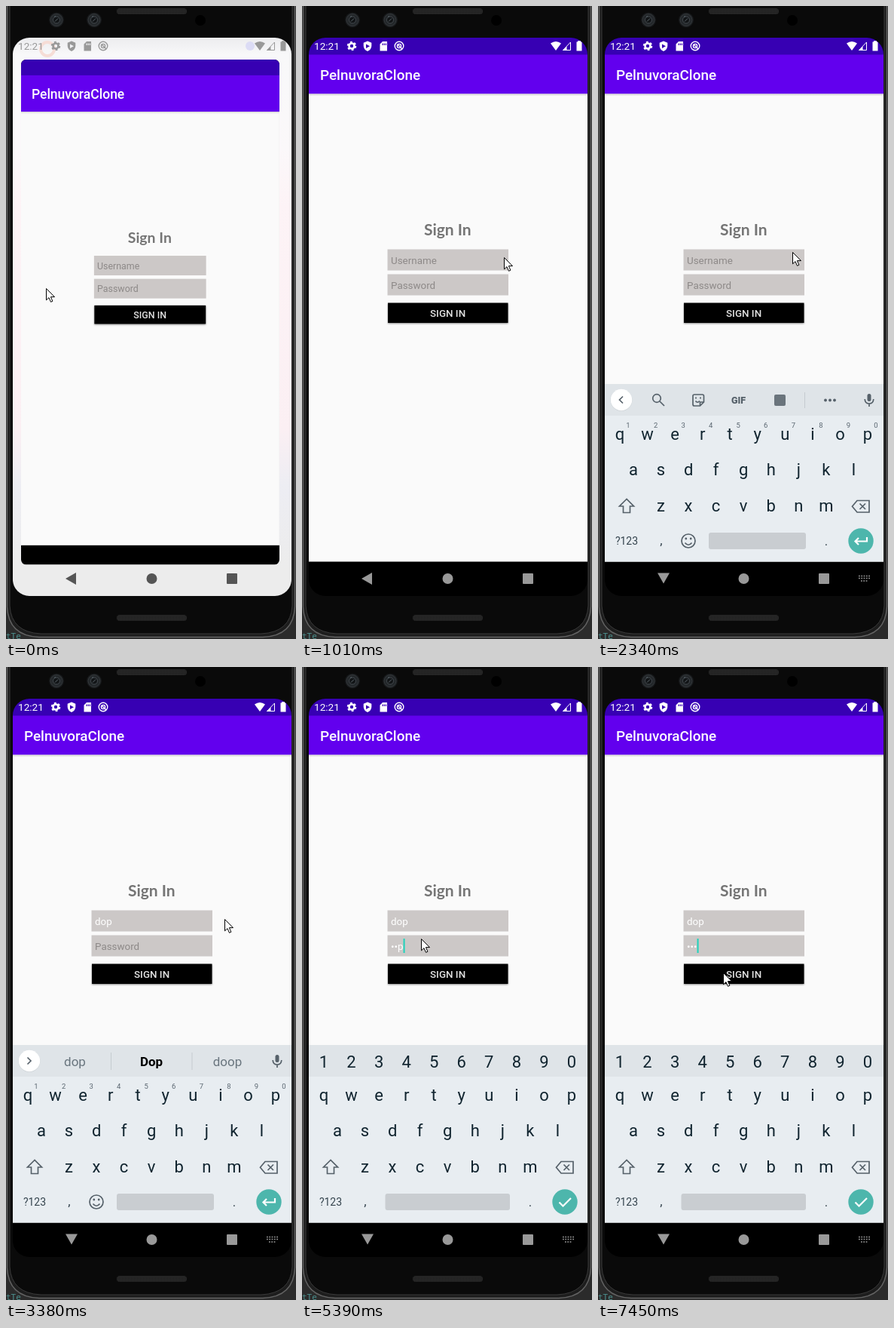
An HTML page that plays this animation: 385 by 839 pixels, repeating every 8 s.

```html
<!DOCTYPE html>
<html lang="en">
<head>
<meta charset="utf-8">
<title>Sign in</title>
<style>
  html, body { margin: 0; width: 100%; height: 100%; overflow: hidden; background: #0a0a0a; }
  svg { display: block; width: 100vw; height: 100vh; font-family: Roboto, sans-serif; }
  .mid { text-anchor: middle; }
  .key { font-size: 22px; fill: #10242f; text-anchor: middle; }
  .dot { font-size: 17px; fill: #35444e; text-anchor: middle; }
  .sup { font-size: 9.5px; fill: #5a6670; text-anchor: middle; }
  .word { font-size: 17px; fill: #69757e; text-anchor: middle; }
  .field { font-size: 13.4px; }
  .line { fill: none; stroke: #56616a; stroke-width: 1.7; }
  .raised { filter: drop-shadow(0 1px 1px rgba(0, 0, 0, .45)); }
</style>
</head>
<body>
<svg viewBox="0 0 385 839" preserveAspectRatio="none">
  <defs>
    <linearGradient id="wall" x2="0" y2="1">
      <stop offset="0" stop-color="#ececee"/>
      <stop offset=".03" stop-color="#f8f8f9"/>
      <stop offset=".2" stop-color="#fbf8fa"/>
      <stop offset=".3" stop-color="#fdf3f6"/>
      <stop offset=".7" stop-color="#fbeff3"/>
      <stop offset=".8" stop-color="#ededf3"/>
      <stop offset=".95" stop-color="#ececec"/>
    </linearGradient>
    <linearGradient id="barShadow" x2="0" y2="1">
      <stop offset="0" stop-color="#d2d2d2"/>
      <stop offset="1" stop-color="#fafafa"/>
    </linearGradient>
    <pattern id="mesh" width="2" height="2" patternUnits="userSpaceOnUse">
      <rect width="2" height="2" fill="#292929"/>
      <rect width="1" height="1" fill="#171717"/>
    </pattern>
    <clipPath id="screenClip"><rect x="9" y="42" width="370" height="740" rx="22"/></clipPath>
    <clipPath id="openClip"><rect x="9" y="42" width="370" height="722" rx="7"/></clipPath>
    <clipPath id="kbClip"><rect x="9" y="117" width="370" height="619.500"/></clipPath>
    <g id="lens">
      <circle r="10" fill="#17191b"/>
      <circle r="8" fill="#23272a" stroke="#34383b"/>
      <circle r="4.500" fill="#121517" stroke="#454b50"/>
      <path d="M-2 2L2-2M-3-4L-1-5" stroke="#5d676e"/>
    </g>
  </defs>

  <!-- phone body -->
  <rect width="385" height="839" fill="#2b2b2b"/>
  <text x="0" y="839" font-size="11" fill="#4c8f8d" style="font-family:'DejaVu Sans Mono',monospace">tTe</text>
  <path d="M1.500-5V796Q3 835 44 836.500H341Q382 835 383.500 796V-5Z" fill="#1d1d1d" stroke="#636363" stroke-width="1.500"/>
  <path d="M5-5V795Q7 830 46 832H339Q378 830 380 795V-5Z" fill="#0a0a0a" stroke="#3a3a3a"/>
  <rect x="147" y="3" width="93" height="8" rx="4" fill="url(#mesh)"/>
  <rect x="147" y="807" width="93" height="8" rx="4" fill="url(#mesh)"/>
  <use href="#lens" x="67" y="18.500"/>
  <use href="#lens" x="117" y="18.500"/>
  <circle cx="258" cy="19" r="7" fill="#000"/>

  <g clip-path="url(#screenClip)">
    <g id="home">
      <rect x="9" y="42" width="370" height="740" fill="url(#wall)"/>
      <circle cx="55" cy="57" r="9" fill="none" stroke="#f6ddd6" stroke-width="4"/>
      <circle cx="324" cy="53" r="6" fill="#dcdcf5"/>
    </g>
    <g id="appClip">
      <g id="app">
        <rect x="9" y="42" width="370" height="740"/>
        <rect x="9" y="42" width="370" height="23" fill="#3700b3"/>
        <rect x="9" y="116" width="370" height="620.500" fill="#fafafa"/>
        <rect x="9" y="64.500" width="370" height="52" fill="#6200ee"/>
        <rect x="9" y="116.500" width="370" height="3" fill="url(#barShadow)"/>
        <text x="24" y="98" font-size="18.9" font-weight="500" fill="#fff">PelnuvoraClone</text>
        <text class="mid" x="193.300" y="304" font-size="21" font-weight="700" fill="#757575" style="font-family:Lato,sans-serif">Sign In</text>
        <rect x="113.500" y="322.500" width="160.500" height="28" fill="#ccc8c7"/>
        <rect x="113.500" y="355.500" width="160.500" height="28" fill="#ccc8c7"/>
        <text class="field" id="user" x="118" y="342"></text>
        <text class="field" id="pass" x="118" y="374.700"></text>
        <rect id="caret" width="2" height="19" fill="#1fd3bc"/>
        <rect class="raised" x="114" y="393.500" width="159.500" height="26.500"/>
        <text class="mid" x="193.600" y="412.300" font-size="13.4" font-weight="500" fill="#e2e2e2">SIGN IN</text>
      </g>
    </g>

    <g clip-path="url(#kbClip)">
      <g id="kb">
        <rect x="9" y="501" width="370" height="236" fill="#e8edf1"/>
        <rect x="9" y="501" width="370" height="42" fill="#dfe4e8"/>
        <g id="keys"></g>
        <path class="line" d="M38 653.500L28.500 663H33.500V671.500H42.500V663H47.500Z"/>
        <path class="line" d="M344 655.500H360V671H344L337.500 663.300ZM347.500 659.500L355 667M355 659.500L347.500 667"/>
        <text class="mid" x="38" y="714" font-size="14" fill="#35444e">?123</text>
        <rect id="space" y="698" height="22" rx="3" fill="#c9cdd1"/>
        <circle cx="349" cy="709" r="16.700" fill="#4db6ac"/>
        <path id="action" fill="none" stroke="#fff" stroke-width="2.200"/>

        <g id="letterExtras">
          <g id="sups"></g>
          <g class="line">
            <circle cx="120" cy="709" r="9"/>
            <path d="M115.500 711.500Q120 717 124.500 711.500"/>
          </g>
          <g fill="#56616a"><circle cx="116.800" cy="706" r="1.400"/><circle cx="123.200" cy="706" r="1.400"/></g>
          <circle cx="31" cy="522.500" r="14.500" fill="#cfd5d9"/>
          <circle cx="31" cy="522" r="14.200" fill="#fff"/>
          <path id="chevron" class="line"/>
          <rect x="357.500" y="514" width="5" height="10" rx="2.500" fill="#56616a"/>
          <path class="line" d="M354.200 521Q354.500 527 360 527T365.800 521M360 527V531" stroke-width="1.500"/>
        </g>
        <g id="tools">
          <circle class="line" cx="78" cy="520" r="5.300" stroke-width="2"/>
          <path class="line" d="M82 524L88 530" stroke-width="2.200"/>
          <path class="line" d="M140.500 525V517Q140.500 515 138.500 515H128Q126 515 126 517V528Q126 530 128 530H135.500ZV525H135.500V530"/>
          <path class="line" d="M129.500 523.500Q132 527 135 523.500M130 518.500v2M136 518.500v2" stroke-width="1.500"/>
          <text class="mid" x="186.500" y="526.500" font-size="12.500" font-weight="900" fill="#56616a">GIF</text>
          <rect x="234" y="515" width="15" height="15" rx="2" fill="#6a747c"/>
          <path d="M274.500 512V533" stroke="#c5cbd0"/>
          <g fill="#56616a"><circle cx="302" cy="522.500" r="1.900"/><circle cx="308" cy="522.500" r="1.900"/><circle cx="314" cy="522.500" r="1.900"/></g>
        </g>
        <g id="words">
          <path d="M139.500 511V534M247 511V534" stroke="#c5cbd0"/>
          <text class="word" x="91.500" y="529">dop</text>
          <text class="word" x="193" y="529" style="fill:#000;font-weight:700">Dop</text>
          <text class="word" x="294" y="529">doop</text>
        </g>
      </g>
    </g>

    <!-- status bar -->
    <g id="status">
      <text x="16" y="58.300" font-size="13.6">12:21</text>
      <circle cx="66" cy="53" r="3.500" fill="none" stroke="currentColor" stroke-width="2.600"/>
      <circle cx="66" cy="53" r="5.300" fill="none" stroke="currentColor" stroke-width="1.900" stroke-dasharray="2.8 2.75"/>
      <path fill-rule="evenodd" d="M87 46.500L92.300 48.800V53Q92 58 87 60Q82 58 81.700 53V48.800ZM85 50.500V56L90 53.200Z"/>
      <path fill-rule="evenodd" d="M107 47H113V59.500H103.500V50.500ZM106.500 49.500V52H107.700V49.500ZM108.700 49.500V52H109.900V49.500ZM110.900 49.500V52H112V49.500Z"/>
      <g fill="none" stroke="currentColor" stroke-width="1.400">
        <circle cx="129" cy="53" r="5.800"/>
        <circle cx="129" cy="53" r="2.600"/>
        <path d="M127 51L133 57"/>
        <path d="M346.500 58.500H356.500V48Z" stroke-width="1"/>
      </g>
      <path d="M330 49.500Q337 44.500 344 49.500L337 59Z"/>
      <path d="M346 59L351.500 53.500V59Z"/>
      <path d="M366 47.500V46.300H370V47.500H371.500V59.500H364.500V47.500Z"/>
    </g>

    <!-- navigation bar -->
    <g id="nav">
      <path id="back"/>
      <circle cx="193.500" cy="759" r="7"/>
      <rect x="293" y="752" width="14" height="14" rx="1"/>
      <path id="kbIcon" d="M346 755.500H361M346 758.500H361M349 762H358" stroke="currentColor" stroke-width="1.700" stroke-dasharray="1.8 1.5"/>
    </g>
  </g>

  <path id="mouse" d="M.5.5V15.800L4 12.600L6.500 18.300L8.900 17.200L6.400 11.600H11.500Z" fill="#fff" stroke="#000"/>
</svg>

<script>
const LOOP = 8000;
const $ = id => document.getElementById(id);
const set = (id, attrs) => {
  for (const name in attrs) $(id).setAttribute(name, attrs[name]);
};
const show = (id, on) => $(id).style.display = on ? "" : "none";
const text = (cls, x, y, s) => `<text class="${cls}" x="${x}" y="${y}">${s}</text>`;
const row = (cls, chars, x, y) =>
  [...chars].map((c, i) => text(cls, x + i * 36.55, y, c)).join("");

$("keys").innerHTML =
  `<g id="digits">${row("key", "1234567890", 29, 531)}</g>` +
  row("key", "qwertyuiop", 29, 574.5) +
  row("key", "asdfghjkl", 47, 621.5) +
  row("key", "zxcvbnm", 83.5, 669.5) +
  text("dot", 84, 714, ",") + text("dot", 303, 715, ".");
$("sups").innerHTML = row("sup", "1234567890", 40, 559);

// Each entry holds from its time until the next one.
const at = (track, t) => track.reduce((found, step) => t >= step[0] ? step : found);

const mouse = [
  [0, 53, 374], [480, 54, 375],
  [620, 96, 366], [740, 168, 349], [860, 221, 339],
  [1010, 268, 333], [1130, 282, 329], [1250, 276, 327], [1370, 265, 327], [1490, 259, 327],
  [1860, 258, 326],
  [3380, 290, 334], [3500, 337, 345], [3620, 265, 352], [3740, 190, 358], [3860, 158, 359],
  [4010, 158, 360],
  [5930, 157, 361], [6050, 155, 361], [6190, 154, 376], [6310, 154, 394], [6440, 155, 404],
  [7210, 160, 405], [7330, 164, 405], [7450, 166, 405]
];
const userTyped = [[0, ""], [2730, "do"], [2850, "dop"]];
const passTyped = [[0, ""], [5150, "d"], [5270, "•o"], [5390, "••p"], [6930, "•••"]];
const caretOn = [
  [0, 0], [2460, 1], [3380, 0], [3860, 1], [4620, 0],
  [5150, 1], [5930, 0], [6440, 1], [6930, 0], [7450, 1]
];
const kbDrop = [[0, 240], [2220, 95], [2340, 0]];

function fill(id, typed, hint) {
  const el = $(id), value = typed || hint;
  if (el.textContent !== value) el.textContent = value;
  el.setAttribute("fill", typed ? "#fff" : "#8d8988");
  return typed ? el.getComputedTextLength() : 0;
}

function tint(id, color) {
  set(id, { fill: color, color });
}

function draw(t) {
  const opening = t < 120, keyboard = t >= 1980, numeric = t >= 4620;
  const suggest = t >= 3100 && t < 4370;

  show("home", opening);
  set("app", {
    "clip-path": opening ? "url(#openClip)" : "none",
    transform: opening ? "translate(20 71) scale(.927) translate(-9 -42)" : ""
  });
  tint("status", opening ? "#999999" : t < 240 ? "#8f78ce" : "#ffffff");
  tint("nav", opening ? "#555555" : t < 240 ? "#bdbdbd" : "#999999");
  set("back", { d: keyboard ? "M79 751.500H95L87 765.500Z" : "M93 751V767L79 759Z" });
  show("kbIcon", keyboard);

  const userWidth = fill("user", at(userTyped, t)[1], "Username");
  const passWidth = fill("pass", at(passTyped, t)[1], "Password");
  const onPass = t >= 4010;
  set("caret", { x: 118 + (onPass ? passWidth : userWidth), y: onPass ? 360 : 327 });
  show("caret", at(caretOn, t)[1]);

  const drop = at(kbDrop, t)[1];
  show("kb", drop < 240);
  set("kb", { transform: `translate(0 ${drop})` });
  show("digits", numeric);
  show("letterExtras", !numeric);
  show("tools", !numeric && !suggest);
  show("words", suggest);
  set("chevron", { d: suggest ? "M28.500 517.500L33 522L28.500 526.500" : "M33 517.500L28.500 522L33 526.500" });
  set("space", numeric ? { x: 110.5, width: 165.5 } : { x: 147, width: 129 });
  set("action", {
    d: numeric ? "M341.500 709.500L346.500 714.500L357 704"
               : "M357 704V709.500H341.500M346 705L341.500 709.500L346 714"
  });

  const [, x, y] = at(mouse, t);
  set("mouse", { transform: `translate(${x} ${y})` });
}

const start = performance.now();
function frame() {
  draw((performance.now() - start) % LOOP);
  requestAnimationFrame(frame);
}
frame();
</script>
</body>
</html>
```
